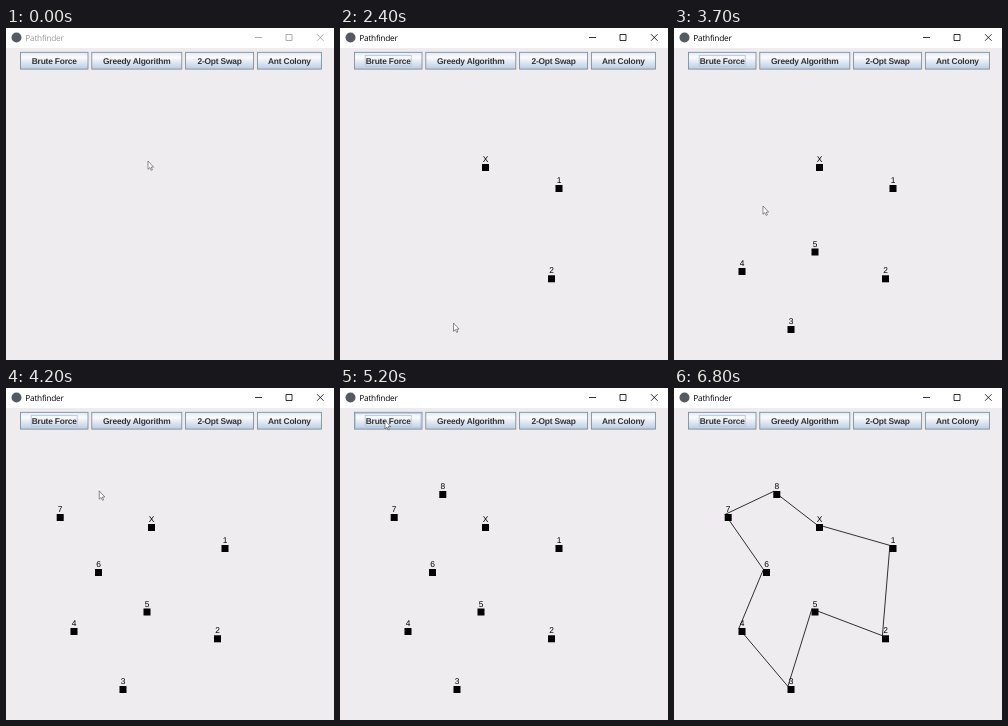
An HTML page that plays this animation: 328 by 332 pixels, repeating every 7200 ms.

```html
<!DOCTYPE html>
<html lang="en">
<head>
<meta charset="utf-8">
<title>Pathfinder</title>
<style>
html, body { margin: 0; width: 100%; height: 100%; overflow: hidden; background: #eeecee; }
svg { display: block; }
text { font: 8.4px "Liberation Sans", Arial, sans-serif; text-anchor: middle; text-rendering: geometricPrecision; }
path, .frame { fill: none; stroke-width: .8; }
.title { font: 8.3px "Open Sans", "Noto Sans", sans-serif; letter-spacing: -.25px; text-anchor: start; fill: currentColor; }
.controls { stroke: currentColor; }
.button text { font-weight: bold; letter-spacing: -.18px; fill: #333; }
.button rect { fill: url(#metal); stroke: #7a8a99; stroke-width: .85; }
</style>
</head>
<body>
<svg width="328" height="332" viewBox="0 0 328 332">
  <linearGradient id="metal" x2="0" y2="1">
    <stop stop-color="#e2eaf4"/>
    <stop offset=".3" stop-color="#fafbfd"/>
    <stop offset=".6" stop-color="#dfe7f2"/>
    <stop offset="1" stop-color="#bccce2"/>
  </linearGradient>
  <rect width="328" height="332" fill="#eeecee"/>
  <rect width="328" height="20" fill="#fff"/>
  <circle cx="10.5" cy="9.5" r="5" fill="#555a60"/>
  <g id="chrome">
    <text class="title" x="19.3" y="12.6">Pathfinder</text>
    <path class="controls" d="M249 9.5h7M280 6.5h6v6h-6zM311 6.2l6.6 6.6m0-6.6l-6.6 6.6"/>
  </g>
  <g id="buttons"></g>
  <rect id="hover" class="frame" x="15.2" y="25.2" width="65.8" height="15" stroke="#9fb9d4"/>
  <rect id="focus" class="frame" x="25.2" y="27.5" width="46" height="10.6" stroke="#b3c3d5"/>
  <g id="nodes"></g>
  <path id="tour" stroke="#000"/>
  <path id="cursor" d="M0 0V8.3L1.9 6.6L3.2 9.4L4.4 8.9L3.2 6.1H5.6Z" style="fill:#fff;stroke:#444;stroke-width:.6"/>
</svg>
<script>
const LOOP = 7200, STEP = 100, SOLVED = 5500, BAR_BOTTOM = 41;
const $ = id => document.getElementById(id);
const show = (id, on) => $(id).setAttribute("visibility", on ? "visible" : "hidden");

// Pointer stops: x, y, arrival, departure. A labelled stop drops a node.
const stops = [
  [142, 133, 0, 400, "X"], [215.5, 154, 600, 800, "1"], [223.5, 200, 1200, 2200],
  [208, 244.3, 2300, 2300, "2"], [113.5, 295, 2400, 2500, "3"], [64.5, 237, 2800, 2900, "4"],
  [137.5, 217.5, 3300, 3300, "5"], [89, 178, 3700, 3700, "6"], [50.7, 123, 4000, 4000, "7"],
  [99.3, 100, 4400, 4500, "8"], [45, 32.5, 5200, 6500], [192, 142, 6800, LOOP]
];
const nodes = stops.filter(stop => stop[4]);
const tour = [..."X12534678"].map(label => nodes.find(node => node[4] === label));

let left = 14.5;
for (const [label, width] of [["Brute Force", 67.5], ["Greedy Algorithm", 90], ["2-Opt Swap", 68], ["Ant Colony", 64]]) {
  $("buttons").innerHTML += `<g class="button"><rect x="${left}" y="24.3" width="${width}" height="16.8"/>
    <text x="${left + width / 2}" y="36">${label}</text></g>`;
  left += width + 3.8;
}
$("nodes").innerHTML = nodes.map(([x, y, , , label]) =>
  `<g id="node${label}"><rect x="${x}" y="${y + 3}" width="7" height="7"/>
   <text x="${x + 3.5}" y="${y + 1}">${label}</text></g>`).join("");
$("tour").setAttribute("d", "M" + tour.map(([x, y]) => [x + .4, y + 3.4]).join("L") + "Z");

// Eases out from each stop to the next.
function pointer(t) {
  const i = stops.findIndex(stop => t <= stop[3]);
  const [x, y, arrive] = stops[i];
  if (t >= arrive) return [x, y];
  const [x0, y0, , leave] = stops[i - 1];
  const rest = (1 - (t - leave) / (arrive - leave)) ** 3;
  return [x + (x0 - x) * rest, y + (y0 - y) * rest];
}

function draw(now) {
  const t = Math.floor(now % LOOP / STEP) * STEP;
  const [x, y] = pointer(t);
  const active = t > nodes[0][3];
  $("chrome").style.color = active ? "#000" : "#999";
  show("focus", active);
  show("hover", y < BAR_BOTTOM);
  for (const [, , , leave, label] of nodes) show("node" + label, t > leave);
  show("tour", t >= SOLVED);
  show("cursor", t < 6800);
  $("cursor").setAttribute("transform", `translate(${x} ${y})`);
}

const start = performance.now();
function tick() {
  draw(performance.now() - start);
  requestAnimationFrame(tick);
}
tick();
</script>
</body>
</html>
```
